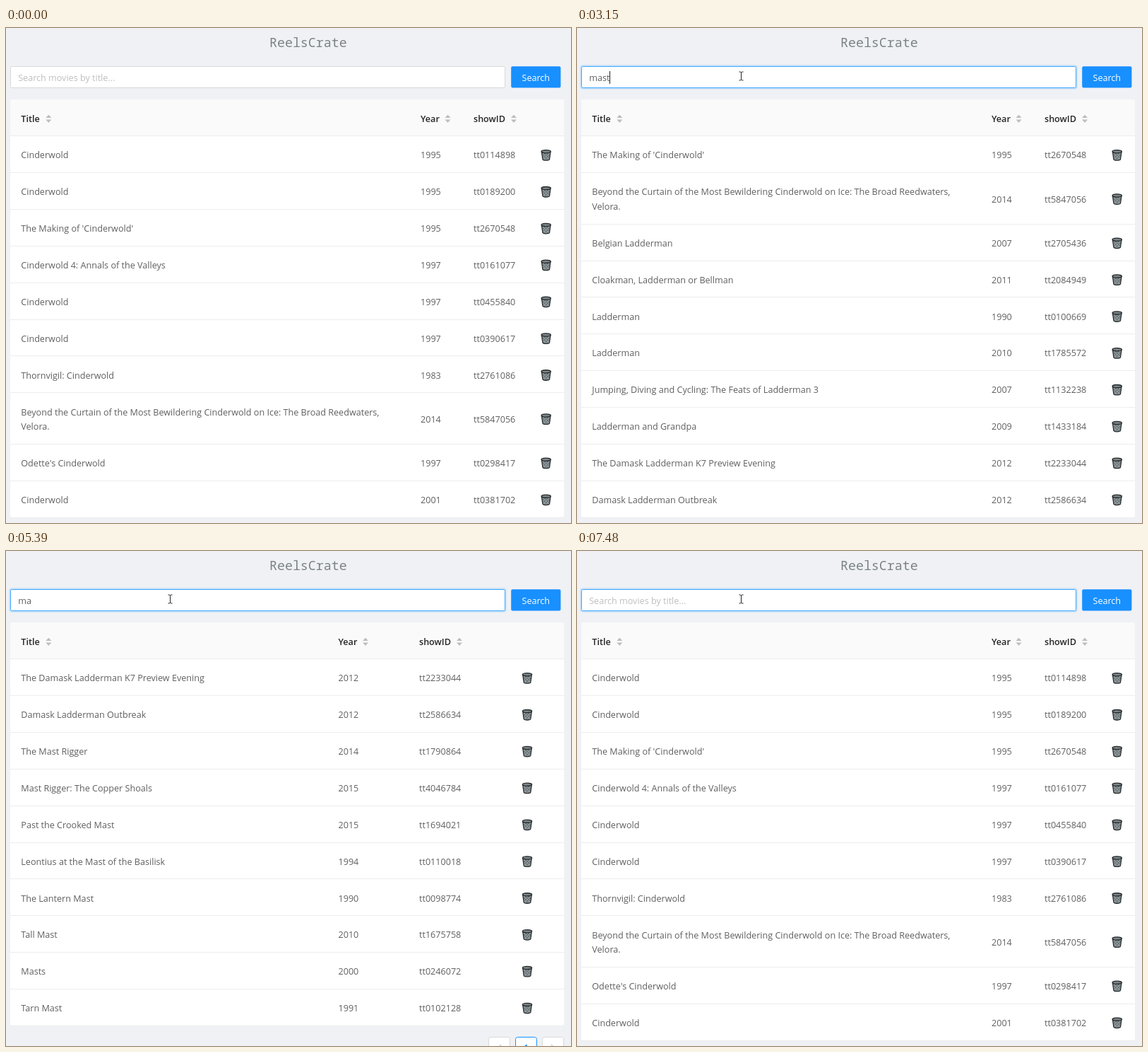
An HTML page for the animation above (8000 ms loop, 800 by 700 pixels).

```html
<!DOCTYPE html>
<html lang="en">
<head>
<meta charset="utf-8">
<title>ReelsCrate</title>
<style>
  html, body { margin: 0; width: 100%; height: 100%; overflow: hidden; background: #eff1f5; }
  svg { display: block; width: 800px; height: 700px; font: 12.6px "Open Sans", "Noto Sans", sans-serif; }
  .cell { fill: #606060; }
  .head { fill: #262626; font-weight: 600; }
  .brand { font: 18.3px "Noto Sans Mono", "DejaVu Sans Mono", monospace; fill: #7c8283; }
</style>
</head>
<body>
<svg viewBox="0 0 800 700" xmlns="http://www.w3.org/2000/svg">
  <defs>
    <g id="sort" fill="#bdbdbd">
      <path d="M-4 -1.2L0 -5.6L4 -1.2Z"/>
      <path d="M-4 1.2L0 5.6L4 1.2Z"/>
    </g>
    <g id="bin" stroke="#24282a" stroke-linejoin="round">
      <path d="M-6.3 -5L-4.8 5.6Q-4.5 7.2 0 7.2Q4.5 7.2 4.8 5.6L6.3 -5Z" fill="#929b9e" stroke-width="1.3"/>
      <path d="M-5 -1L2.5 6.6M-3 -3L4.5 4M1 -3L5 1M5 -1L-2.5 6.6M3 -3L-4.5 4M-1 -3L-5 1" fill="none" stroke="#596164" stroke-width=".8"/>
      <ellipse cy="-5.2" rx="6.6" ry="2.1" fill="#7b8487" stroke-width="1.3"/>
    </g>
    <g id="pager" fill="#fff" stroke="#d9d9d9">
      <rect x="683.5" y="687.5" width="30" height="30" rx="3"/>
      <rect x="759.5" y="687.5" width="30" height="30" rx="3"/>
      <rect x="721.5" y="687.5" width="30" height="30" rx="3" stroke="#1890ff"/>
      <path d="M701 698L696 703L701 708M772 698L777 703L772 708" fill="none" stroke="#c8c8c8" stroke-width="1.2"/>
      <text x="736.5" y="706.5" text-anchor="middle" fill="#1890ff" stroke="none" font-weight="600">1</text>
    </g>
  </defs>
  <rect width="800" height="700" fill="#eff1f5"/>
  <text class="brand" x="373" y="27">ReelsCrate</text>

  <rect id="glow" x="4.3" y="52.3" width="704.4" height="34.4" rx="4" fill="#1890ff"/>
  <rect id="box" x="6.5" y="54.5" width="700" height="30" rx="2" fill="#fff"/>
  <text id="hint" x="17.2" y="75.3" fill="#bfbfbf">Search movies by title...</text>
  <text id="query" x="17.2" y="75.3" class="cell"></text>
  <rect id="caret" y="61" width="1" height="18" fill="#222"/>
  <rect x="715.2" y="54.2" width="70.2" height="30.3" rx="2" fill="#1890ff"/>
  <text x="750.3" y="75.3" text-anchor="middle" fill="#fff">Search</text>

  <g id="tables"></g>

  <circle id="click" cx="230.5" cy="68" r="11.5" fill="#ffff3c" opacity=".85"/>
  <path id="beam" d="M-3 -6H-1L0 -5L1 -6H3M0 -5V5M-3 6H-1L0 5L1 6H3" fill="none" stroke="#222"/>
  <path id="arrow" d="M.5 .5V16.5L4.2 13L6.7 18.6L9 17.6L6.6 12.1H11.8Z" fill="#fff" stroke="#111"/>
</svg>
<script>
const LOOP = 8000;
const $ = id => document.getElementById(id);

const movies = [
  ["Cinderwold", 1995, "0114898"],
  ["Cinderwold", 1995, "0189200"],
  ["The Making of 'Cinderwold'", 1995, "2670548"],
  ["Cinderwold 4: Annals of the Valleys", 1997, "0161077"],
  ["Cinderwold", 1997, "0455840"],
  ["Cinderwold", 1997, "0390617"],
  ["Thornvigil: Cinderwold", 1983, "2761086"],
  ["Beyond the Curtain of the Most Bewildering Cinderwold on Ice: The Broad Reedwaters,|Velora.", 2014, "5847056"],
  ["Odette's Cinderwold", 1997, "0298417"],
  ["Cinderwold", 2001, "0381702"],
  ["Belgian Ladderman", 2007, "2705436"],
  ["Cloakman, Ladderman or Bellman", 2011, "2084949"],
  ["Ladderman", 1990, "0100669"],
  ["Ladderman", 2010, "1785572"],
  ["Jumping, Diving and Cycling: The Feats of Ladderman 3", 2007, "1132238"],
  ["Ladderman and Grandpa", 2009, "1433184"],
  ["The Damask Ladderman K7 Preview Evening", 2012, "2233044"],
  ["Damask Ladderman Outbreak", 2012, "2586634"],
  ["The Mast Rigger", 2014, "1790864"],
  ["Mast Rigger: The Copper Shoals", 2015, "4046784"],
  ["Past the Crooked Mast", 2015, "1694021"],
  ["Leontius at the Mast of the Basilisk", 1994, "0110018"],
  ["The Lantern Mast", 1990, "0098774"],
  ["Tall Mast", 2010, "1675758"],
  ["Masts", 2000, "0246072"],
  ["Tarn Mast", 1991, "0102128"],
  ["Tall Mast", 1953, "0046057"],
  ["Mast Rigger: The Ash Shoals", 2015, "4844320"]
];

// x of the year, id and bin columns for each filter
const columns = {
  "": [587, 662, 764.7],
  m: [587, 662, 764.7],
  ma: [511, 612, 746],
  mas: [470.5, 585, 738],
  mast: [440, 565, 731]
};

// [start time, value] pairs; each value holds until the next
const typed = [[0, ""], [1900, "m"], [2050, "ma"], [2430, "mas"], [2750, "mast"],
  [4390, "mas"], [5080, "ma"], [5620, "m"], [6550, ""]];
const filter = [[0, ""], [3150, "m"], [3230, "ma"], [3300, "mas"], [3450, "mast"],
  [4850, "mas"], [5540, "ma"], [6250, "m"], [6950, ""]];
const caretOn = [[0, 0], [1130, 1], [1670, 0], [1900, 1], [3300, 0], [3760, 1], [4310, 0],
  [4850, 1], [5390, 0], [5850, 1], [6400, 0], [6950, 1], [7480, 0]];
const pointer = [[0, null], [120, ["arrow", 687, 515]], [200, ["arrow", 320, 345]], [280, ["beam", 27.5, 220.5]],
  [520, ["arrow", 60, 197]], [600, ["arrow", 120, 158]], [680, ["arrow", 180, 113]],
  [750, ["beam", 222.5, 78.5]], [830, ["beam", 232.5, 68]]];

const at = (steps, t) => steps.findLast(([start]) => start <= t)[1];
const ramp = (t, from, to) => Math.min(1, Math.max(0, (t - from) / (to - from)));
const show = (el, on) => el.setAttribute("display", on ? "inline" : "none");
const text = (x, y, s, cls = "cell") => `<text class="${cls}" x="${x}" y="${y}">${s}</text>`;
const use = (id, x, y) => `<use href="#${id}" x="${x}" y="${y}"/>`;
const line = y => `<rect x="6" y="${Math.floor(y)}" width="784" height="1" fill="#ededed"/>`;

function tableMarkup(key) {
  const [yearX, idX, binX] = columns[key];
  let y = 152.8, rows = "";
  const found = movies.filter(([title]) => title.toLowerCase().includes(key)).slice(0, 10);
  for (const [title, year, id] of found) {
    const lines = title.split("|");
    const height = lines.length > 1 ? 72.6 : 51.85;
    const base = y + height / 2 + 5.7;
    lines.forEach((s, i) => rows += text(21.3, base + (i - (lines.length - 1) / 2) * 20.4, s));
    rows += text(yearX, base, year) + text(idX, base, "tt" + id) + use("bin", binX, base - 4.5);
    y += height;
    rows += line(y);
  }
  const head = [["Title", 21.3, 39], ["Year", yearX, 38.5], ["showID", idX, 57]]
    .map(([label, x, gap]) => text(x, 132.6, label, "head") + use("sort", x + gap, 128.3)).join("");
  return `<rect x="6" y="101" width="784" height="${y - 101}" rx="3" fill="#fff"/>
    <path d="M6 153V104Q6 101 9 101H787Q790 101 790 104V153Z" fill="#fafafa"/>
    ${line(152.8)}${head}${rows}${y < 680 ? '<use href="#pager"/>' : ""}`;
}

const tables = Object.keys(columns).map(key => {
  const g = document.createElementNS("http://www.w3.org/2000/svg", "g");
  g.innerHTML = tableMarkup(key);
  $("tables").append(g);
  return [key, g];
});

function render(t) {
  const query = at(typed, t), key = at(filter, t), cursor = at(pointer, t);
  for (const [name, g] of tables) show(g, name === key);

  $("query").textContent = query;
  show($("hint"), !query);
  const width = query ? $("query").getComputedTextLength() : 0;
  $("caret").setAttribute("x", Math.round(16.6 + width));
  show($("caret"), at(caretOn, t));

  const hover = ramp(t, 700, 830);
  const mix = (from, to) => Math.round(from + (to - from) * hover);
  $("box").setAttribute("stroke", `rgb(${mix(217, 64)},${mix(217, 169)},${mix(217, 255)})`);
  $("glow").setAttribute("opacity", 0.18 * ramp(t, 1080, 1360));
  show($("click"), t >= 1130 && t < 1360);

  for (const kind of ["arrow", "beam"]) {
    const on = cursor && cursor[0] === kind;
    show($(kind), on);
    if (on) $(kind).setAttribute("transform", `translate(${cursor[1]} ${cursor[2]})`);
  }
}

const began = performance.now();
function tick() {
  render((performance.now() - began) % LOOP);
  requestAnimationFrame(tick);
}
tick();
</script>
</body>
</html>
```
